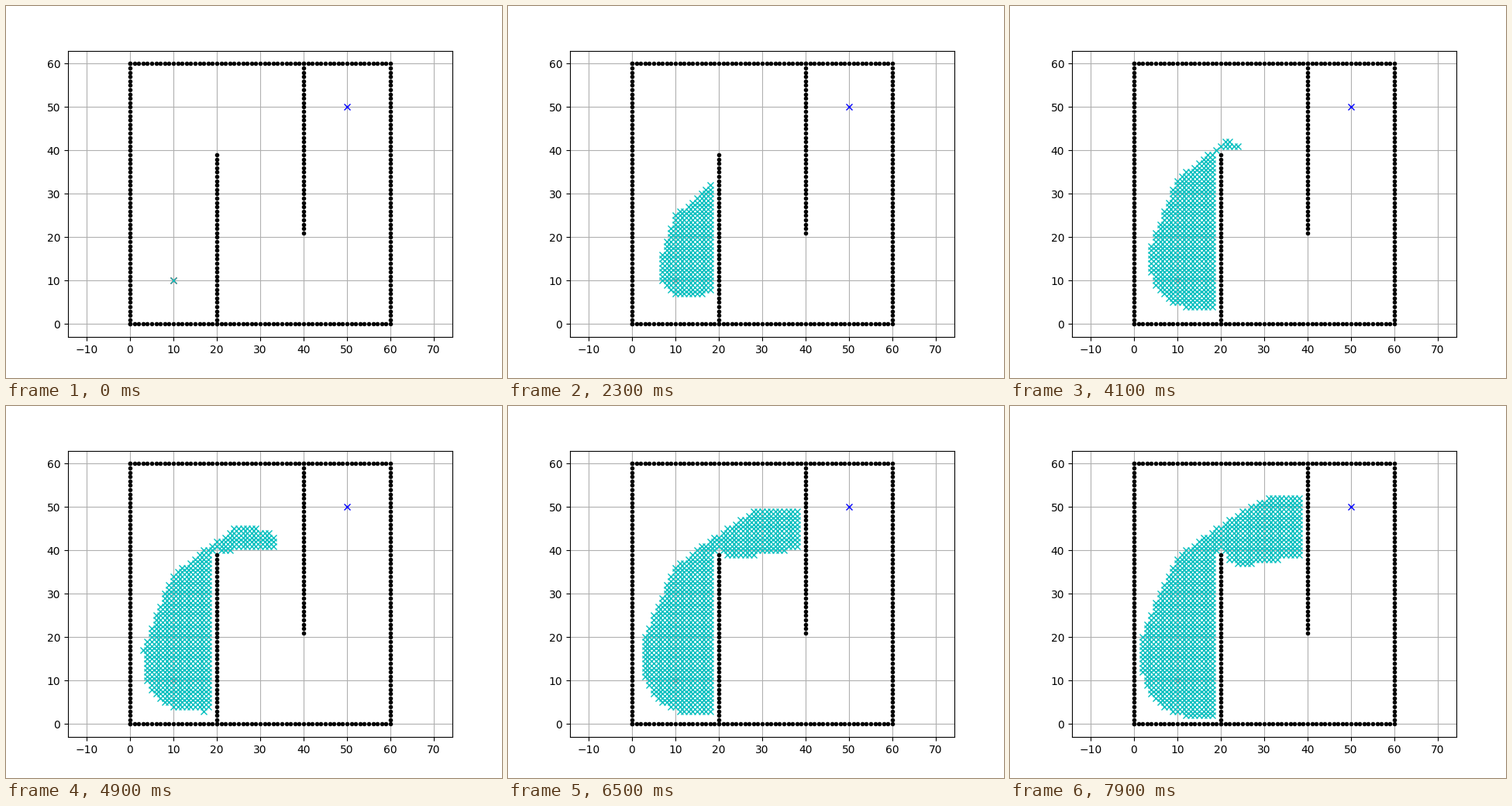
These frames come from a looping animation (640x480 px, 8 s). A matplotlib script:

```python
"""A* search spreading over a walled grid map."""
import math

import matplotlib.pyplot as plt
from matplotlib.animation import FuncAnimation

START, GOAL = (10, 10), (50, 50)
SIZE = 60
ROBOT_RADIUS = 1
FRAMES = 80
NODES_PER_FRAME = 10

MOVES = [(1, 0), (0, 1), (-1, 0), (0, -1),
         (-1, -1), (-1, 1), (1, -1), (1, 1)]


def build_walls():
    walls = [(i, 0) for i in range(SIZE)]
    walls += [(SIZE, i) for i in range(SIZE)]
    walls += [(i, SIZE) for i in range(SIZE + 1)]
    walls += [(0, i) for i in range(SIZE + 1)]
    walls += [(20, i) for i in range(40)]
    walls += [(40, SIZE - i) for i in range(40)]
    return walls


def blocked_cells(walls):
    r = ROBOT_RADIUS
    disc = [(dx, dy) for dx in range(-r, r + 1) for dy in range(-r, r + 1)
            if math.hypot(dx, dy) <= r]
    return {(x + dx, y + dy) for x, y in walls for dx, dy in disc}


def heuristic(cell):
    return math.sqrt((GOAL[0] - cell[0]) ** 2 + (GOAL[1] - cell[1]) ** 2)


def expand(blocked, limit):
    """Return the first `limit` cells in the order A* visits them."""
    open_set, closed, order = {START: 0.0}, set(), []
    while open_set and len(order) < limit:
        cell = min(open_set, key=lambda c: open_set[c] + heuristic(c))
        order.append(cell)
        if cell == GOAL:
            break
        cost = open_set.pop(cell)
        closed.add(cell)
        for dx, dy in MOVES:
            nxt = (cell[0] + dx, cell[1] + dy)
            if nxt in closed or nxt in blocked:
                continue
            new_cost = cost + math.sqrt(dx * dx + dy * dy)
            if new_cost < open_set.get(nxt, math.inf):
                open_set[nxt] = new_cost
    return order


walls = build_walls()
visited = expand(blocked_cells(walls), (FRAMES - 1) * NODES_PER_FRAME + 1)

fig, ax = plt.subplots(figsize=(6.4, 4.8), dpi=100)
ax.plot(*zip(*walls), ".k")
ax.plot(*START, "xr")
ax.plot(*GOAL, "xb")
ax.grid(True)
ax.axis("equal")
trail, = ax.plot([], [], "xc")


def update(frame):
    trail.set_data(*zip(*visited[:frame * NODES_PER_FRAME + 1]))
    return trail,


anim = FuncAnimation(fig, update, frames=FRAMES, interval=100,
                     init_func=lambda: update(0), repeat=True, repeat_delay=0)
plt.show()
```
